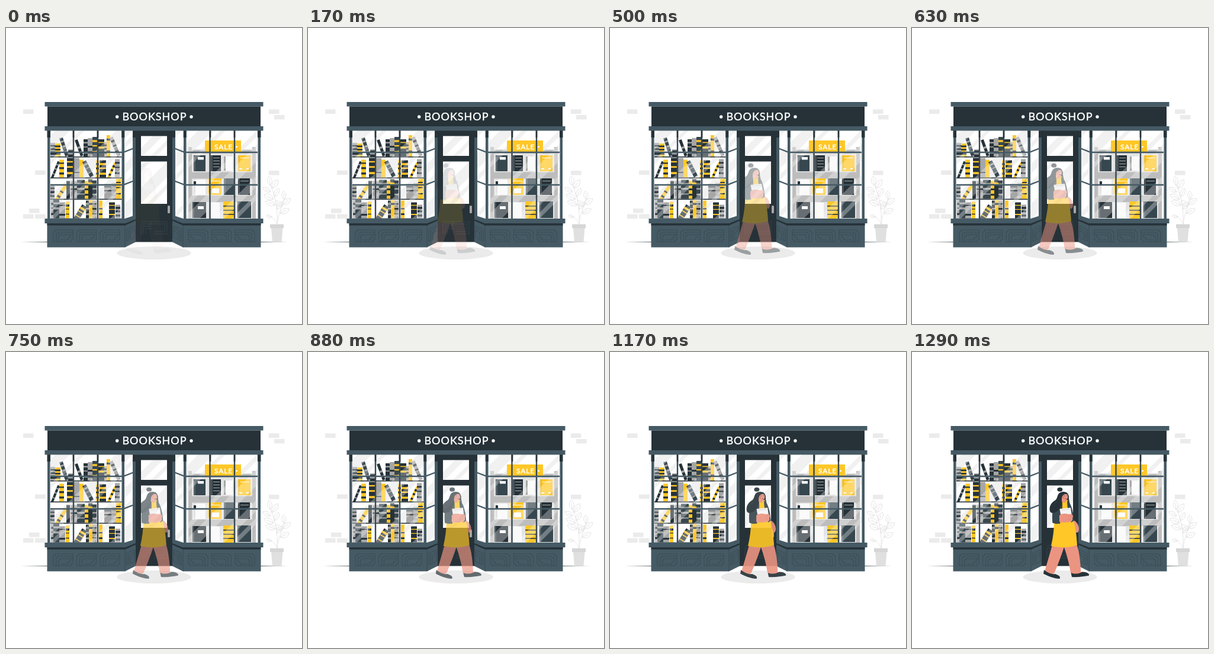
An HTML page for the animation above (1330 ms loop, 500 by 500 pixels).

```html
<!DOCTYPE html>
<html lang="en">
<head>
<meta charset="utf-8">
<title>Bookshop</title>
<style>
html, body { margin: 0; width: 100%; height: 100%; overflow: hidden; background: #fff; }
svg { display: block; width: 100vw; height: 100vh; }
text { font-family: Lato, "Open Sans", sans-serif; fill: #fff; stroke: #fff; stroke-width: .45; stroke-linejoin: round; text-anchor: middle; }
.dark { fill: #263238; }
.slate { fill: #455a64; }
.mid { fill: #37474f; }
.pale { fill: #ebebeb; }
.yellow { fill: #ffc727; }
.skin { fill: #eb9481; }
.line { fill: none; stroke: #263238; stroke-width: .7; opacity: .45; }
.bars { fill: none; stroke: #37474f; stroke-width: 2.4; }
.plant { fill: none; stroke: #e0e0e0; stroke-width: .8; }
</style>
</head>
<body>
<svg viewBox="0 0 500 500">
  <defs>
    <clipPath id="glass">
      <path d="M75 173H195V322H75ZM200 173H214V317L200 322ZM228 182.500H272V216H228ZM228 225.500H272V297H228ZM286 173H300V322L286 317ZM305 173H425V322H305Z"/>
    </clipPath>
    <g id="panel">
      <path class="line" d="M0 20V3H3V0H33V17H30V20ZM5 20V6H8V4H33M9 20V10H11V8H33M13 17H25V13H29V8"/>
    </g>
  </defs>

  <g id="bricks" class="pale"></g>
  <path d="M25 361.300L70 360.900V361.700ZM476 361.300L430 360.900V361.700Z" class="dark"/>

  <g id="plant" class="plant">
    <path d="M458 332C459 305 456 286 446 264M458 331C460 315 465 304 470 287M458 331C455 325 451 320 447 318"/>
  </g>
  <path d="M446 331.500H469V338H446Z" fill="#d6d6d6"/>
  <path d="M448 338H467.500L465.500 361.500H450Z" fill="#e0e0e0"/>

  <ellipse class="pale" cx="250" cy="380" rx="62.500" ry="11"/>

  <g clip-path="url(#glass)"><g id="shine" fill="#ebebeb"></g></g>
  <g id="books"></g>
  <g id="display"></g>
  <g clip-path="url(#glass)"><use href="#shine" style="filter:brightness(2)" opacity=".3"/></g>

  <g id="sale">
    <path class="yellow" d="M336 190H397V209.500H336Z"/>
    <text x="367.500" y="205.300" font-size="12" letter-spacing=".8">SALE</text>
    <circle cx="389.500" cy="200.700" r="1.500" fill="#fff"/>
  </g>

  <g class="bars">
    <path d="M114 173V322M155 173V322M344.500 173V322M386 173V322"/>
    <path d="M75 210H198L215 203.500M75 265H198L215 258.500M425 210H302L285 203.500M425 265H302L285 258.500" stroke="#455a64"/>
  </g>
  <path class="slate" d="M70 173H74.500V323H70ZM195.500 173H200V323H195.500ZM300 173H304.500V323H300ZM425.500 173H430V323H425.500Z"/>

  <path class="dark" fill-rule="evenodd" d="M218 173H282V361.500H218ZM228 182.500V216H272V182.500ZM228 225.500V297H272V225.500Z"/>
  <path d="M228 327H272V348H250M228 348V331H245V327M232 348V335H244V331H268V344H250M236 348V339H246" fill="none" stroke="#455a64" stroke-width=".7" opacity=".6"/>
  <rect x="273" y="300" width="4" height="13" rx="1.500" fill="#a6a6a6"/>
  <path class="slate" d="M214 173H219V325H214ZM281 173H286V325H281Z"/>
  <path id="eaves" class="dark" d="M69.500 173H75V185H69.500ZM112.700 173H115.300V185H112.700ZM153.700 173H156.300V185H153.700ZM195.300 173H200.300V185H195.300ZM214 173H219V185H214Z"/>
  <use href="#eaves" transform="matrix(-1 0 0 1 500 0)"/>

  <g id="base">
    <path class="slate" d="M69.500 329H201L219 322V361.500L201 370.500H69.500Z"/>
    <path class="dark" d="M69.500 329.500H201L219 322V325.500L201 333.500H69.500Z"/>
    <path class="slate" d="M65.500 322H200.500L219 316V323L201.500 330H65.500Z"/>
    <path d="M201 333V370.500" stroke="#37474f" stroke-width=".8"/>
    <use href="#panel" x="80" y="341"/>
    <use href="#panel" x="119.500" y="341"/>
    <use href="#panel" x="159" y="341"/>
    <path class="line" d="M204 360V340L217 334V354ZM207 357V343L217 338M210 355V346L217 342"/>
  </g>
  <use href="#base" transform="matrix(-1 0 0 1 500 0)"/>

  <path class="slate" d="M65.500 125H434.500V132.500H65.500ZM65.500 166H434.500V173.500H65.500Z"/>
  <path class="dark" d="M70 132.500H430V166H70Z"/>
  <text x="251" y="156.300" font-size="18" letter-spacing="1">BOOKSHOP</text>
  <circle cx="187.700" cy="150" r="2.700" fill="#fff"/>
  <circle cx="313" cy="150" r="2.700" fill="#fff"/>

  <g id="woman">
    <path class="dark" d="M251 237C244 240 247 248 241 251C233 256 231 264 233.500 270C238 275 249 271 252 262L262 255L266.500 264C268 256 264 250 265 244L261 237Z"/>
    <path class="skin" d="M270 284C276 284 281 290 282 298C282 303 280 306 278 305C274 302 271 295 269 289Z"/>
    <path class="skin" d="M237 326H258C254 339 247 358 240.500 373L237 376L224 371L226 364Z"/>
    <path class="skin" d="M257 326H278.500C283 338 284.500 356 285.500 374L270 377L267.500 371C265 354 261 342 257 330Z"/>
    <path class="dark" d="M223 368C228 372 235 376 242 375C247 377 250 378.500 250 381L249.500 383C240 383 230 378.500 222 374.500Z"/>
    <path class="dark" d="M268.500 373C275 375.500 283 375 287 371.500C292 371 297 372.500 299 375.500V377.500C291 379 280 381 270 380Z"/>
    <path class="yellow" d="M251 251L263 250C267 258 269 274 273 286C277 298 278 313 279 326C266 331 248 331 235 327.500C238 314 240 301 240 287Z"/>
    <path class="mid" d="M244 253L253 250C256 262 252 279 250 290L237.500 289C236 276 237 260 244 253Z"/>
    <path class="mid" d="M262 251C268 254 272 266 273.500 285L269 288C265 276 262 264 262 251Z"/>
    <path class="dark" d="M250 240C245 247 247 253 240 258C236 263 236 269 238 272C246 271 252 264 253.500 253Z"/>
    <path class="skin" d="M253 246H261L260 253C258 255.500 254.500 255 253 252Z"/>
    <path class="skin" d="M252 240L262.500 239C264 243 263.500 247.500 261 249.500C257 251.500 252 248 252 240Z"/>
    <path class="dark" d="M249 245C247 238 253 234.500 259 236.500C263 238 265 241 264.500 245L262 240.500C258 239 254 241 253 247Z"/>
    <ellipse class="dark" cx="249.800" cy="232.300" rx="4.500" ry="3.500"/>
    <circle cx="255.500" cy="246" r="1.500" fill="#e27566"/>
    <path d="M256 243H258.500M260.500 242.800H262.500M258.500 247.800L261 247.400" stroke="#263238" stroke-width=".6" fill="none"/>
    <path d="M249.500 265L268 263L271 284L253 287Z" fill="#f5f5f5"/>
    <path d="M252 267L267 265.500" stroke="#c7c7c7" stroke-width=".8"/>
    <path class="mid" d="M238 276L249.500 275V289.500C244 291 239 290 237.500 287Z"/>
    <path class="skin" d="M249 276C253 272 260 273 264 274L270 273.500L272 277L270 286C263 288 256 289 249 287Z"/>
    <path d="M264 276.500L271 277M263.500 280H270.500M263 283.500L270 283" stroke="#d67d6d" stroke-width=".5"/>
  </g>
</svg>

<script>
const NS = "http://www.w3.org/2000/svg";
const ink = { d: "#263238", s: "#37474f", g: "#a6a6a6", l: "#bdbdbd", y: "#ffc727", w: "#fafafa", p: "#e4e4e4" };
const $ = id => document.getElementById(id);

function add(parent, tag, attrs) {
  const el = document.createElementNS(NS, tag);
  for (const key in attrs) el.setAttribute(key, attrs[key]);
  return parent.appendChild(el);
}

function box(parent, x, y, width, height, color) {
  const attrs = { x, y, width, height };
  if (color) attrs.fill = ink[color];
  return add(parent, "rect", attrs);
}

const wall = [[29, 137.5], [444, 137.5], [453, 147], [49, 240.5], [444, 241], [39, 305], [29, 314.5], [49, 314.5]];
for (const [x, y] of wall) box($("bricks"), x, y, 17.5, 7.5);

// Glass reflections
for (const [x, w] of [[84, 24], [125, 8], [186, 28], [222, 9], [258, 16], [288, 9], [325, 26], [362, 9], [424, 10], [448, 28], [500, 18], [530, 10]])
  add($("shine"), "path", { d: `M${x} 173h${w}l-150 150h${-w}Z` });

// Leaves: x, y, length, angle
for (const [x, y, len, turn] of [[446, 266, 16, -95], [449, 271, 18, -55], [447, 277, 15, -150], [453, 285, 16, -60], [452, 289, 18, -155],
  [455, 299, 18, -160], [457, 306, 16, -50], [470, 290, 15, -95], [467, 298, 17, -35], [466, 302, 15, -135], [463, 313, 17, -25], [449, 319, 10, -170]])
  add($("plant"), "path", { d: `M0 0Q${len / 2} ${-len * .5} ${len} 0Q${len / 2} ${len * .5} 0 0H${len * .7}`, transform: `translate(${x} ${y}) rotate(${turn})` });

let seed = 7;
const rand = () => (seed = seed * 16807 % 2147483647) / 2147483647;

// Books: x, width, height, colour, tilt
function shelf(base, list) {
  for (const [x, w, h, color, tilt = 0] of list) {
    const g = add($("books"), "g", { transform: `translate(${x} ${base}) rotate(${tilt})` });
    box(g, 0, -h, w, h, color);
    const trim = color === "y" || color === "g" ? "d" : rand() < .35 ? "y" : "g";
    for (const at of [.18, .48, .74])
      if (rand() < .8) box(g, 0, -h * (at + .1), w, 1.2 + rand() * 2.5, trim);
  }
  box($("books"), 75, base, 120.500, 1.6, "d");
}

shelf(217, [[75, 8, 23, "g"], [83, 9, 22, "y"], [100, 6, 32, "s", -18], [105, 8, 12, "g"], [126, 5, 29, "d", -20],
  [131, 7, 29, "d"], [138, 8, 31, "g"], [146, 8, 33, "s"], [156, 10, 29, "d"], [166, 4, 24, "g"], [170, 6, 36, "y"], [188, 6, 34, "g", -23]]);
shelf(252.5, [[76, 4, 30, "d", 22], [90, 8, 30, "y"], [103, 10, 33, "d"], [114, 10, 33, "g"], [124, 7, 30, "y"],
  [142, 7, 29, "s", -27], [152, 5, 29, "y"], [158, 11, 29, "d"], [171, 4, 28, "y", 25], [184, 8, 31, "g"]]);
shelf(288.5, [[75, 7, 22, "g"], [83, 6, 30, "y", 33], [102, 6, 30, "d"], [109, 11, 30, "g"], [120, 13, 32, "s"],
  [133, 6, 30, "y"], [139, 7, 33, "d"], [146, 7, 31, "s"], [166, 12, 25, "g"], [178, 8, 27, "l"], [186, 8, 34, "y"]]);
shelf(321.5, [[76, 4, 31, "g"], [80, 10, 32, "s"], [90, 10, 27, "g"], [101, 6, 28, "y"], [114, 9, 28, "d", 32],
  [135, 5, 30, "d"], [140, 6, 31, "y"], [146, 7, 30, "g"], [157, 6, 30, "y"], [174, 10, 27, "d"], [185, 8, 23, "g"]]);

// Sale shelves
const show = $("display");
const put = (...args) => box(show, ...args);
put(311, 205, 108, 117, "p");
for (const x of [308, 416]) put(x, 201, 6, 121, "l");
put(308, 206, 114, 6, "l");
for (const y of [243.5, 283]) put(309, y, 112, 11, "l");

function cover(x, y, w, h, color, lines = 0) {
  put(x, y, w, h, color);
  put(x + 1.5, y, .7, h, "g");
  for (let i = 0; i < lines; i++) put(x + 4, y + 4 + i * 5, w - 6, 1, color === "y" ? "w" : "g");
}

cover(317, 215, 20, 27, "s");
put(324, 218, 10, 4.5, "w");
cover(346, 215, 17, 27, "d", 4);
cover(368, 217, 15, 24, "w");
put(368, 217, 3, 24, "g");
cover(392, 215, 21, 27, "y", 1);
put(394, 237, 5, 2, "w");
put(406, 237, 4, 2, "w");
cover(317, 256, 20, 26, "w");
put(317, 259, 4, 7, "d");
cover(342, 254, 22, 28, "y", 1);
put(348, 271, 12, 8, "w");
cover(368, 254, 18, 28, "s");
cover(392, 254, 20, 28, "d", 1);
cover(315, 294, 23, 27, "d");
put(324, 301, 10, 5, "w");
put(346, 295, 15, 26, "w");
put(367, 293, 18, 29, "y");
for (const y of [300, 307, 314]) put(367, y, 18, 1.6, "d");
cover(391, 293, 23, 28, "s");

// She fades in while drifting right, 24 steps a second
const LOOP = 1330, STEPS = 32, STEP = 1000 / 24;
const woman = $("woman");
const start = performance.now();

function draw(now) {
  const t = Math.max(0, now - start) % LOOP;
  const n = Math.min(STEPS - 1, Math.floor((t + 4) / STEP));
  woman.setAttribute("transform", `translate(${(n - STEPS + 1) * .625} 0)`);
  woman.setAttribute("opacity", (n + 1) / STEPS);
  requestAnimationFrame(draw);
}
draw(start);
</script>
</body>
</html>
```
